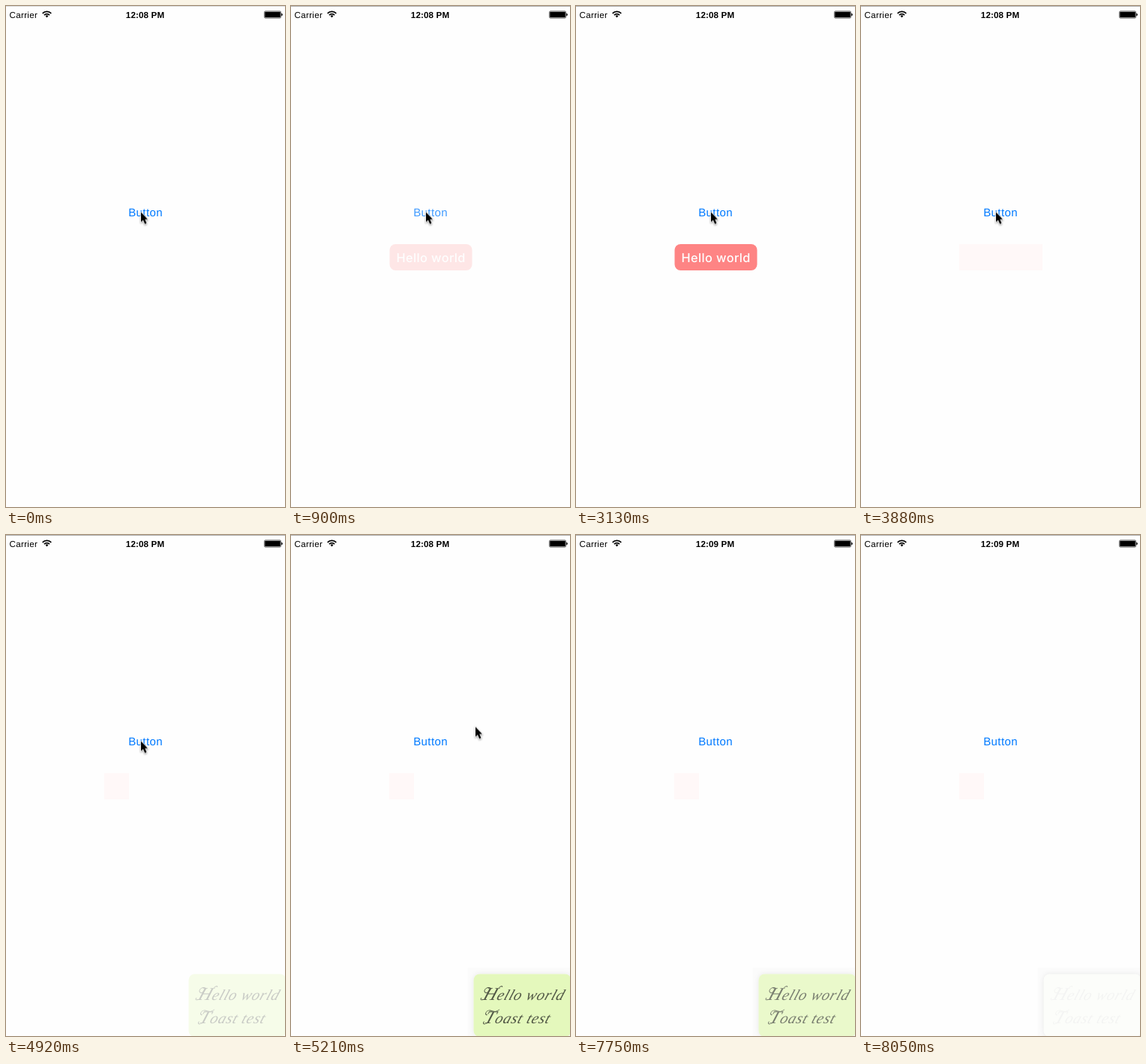
Recreate the animation shown at these times as an HTML page. Size 372 by 667 pixels, loop 8490 ms.

```html
<!DOCTYPE html>
<html lang="en">
<head>
<meta charset="utf-8">
<title>Toast demo</title>
<style>
  html, body { margin: 0; width: 100%; height: 100%; overflow: hidden; background: #fefefe; }
  svg { display: block; width: 372px; height: 667px; }
  text { font-family: "Liberation Sans", Arial, sans-serif; white-space: pre; text-rendering: geometricPrecision; }

  .anim { animation: 8490ms step-end infinite; }
  .edge { animation-name: edge; }
  .button { animation-name: press; fill: #007aff; font-size: 15px; letter-spacing: .4px; }
  .red { animation-name: red; }
  .red text { font: 500 16.3px Inter, sans-serif; letter-spacing: .4px; fill: #fff; }
  .trace { animation-name: trace; }
  .green { animation-name: green; }
  .green text { font: italic 20px "Liberation Serif", Times, serif; letter-spacing: .8px; fill: #39402c; }
  .green .cap { font-size: 24px; }
  .swash { fill: none; stroke: #39402c; stroke-width: .9; stroke-linecap: round; }
  .halo { animation-name: halo; }
  .halo .base { fill: #fefefe; filter: drop-shadow(0 0 3px #00000014); }
  .cursor { animation-name: cursor; }
  .before { animation-name: before; }
  .after { animation-name: after; }
  .status { font-size: 11.6px; letter-spacing: .3px; }
  .clock { font-weight: bold; letter-spacing: .15px; }

  @keyframes edge { 0% { fill: #dcdcdc } 7.067%, 100% { fill: #b2b2b2 } }
  @keyframes press {
    0% { opacity: 1 } 7.067% { opacity: .2 } 8.833% { opacity: .4 }
    10.6% { opacity: .75 } 12.367% { opacity: 1 }
    52.65% { opacity: .2 } 56.183% { opacity: .5 } 57.95%, 100% { opacity: 1 }
  }
  @keyframes red {
    0% { opacity: 0 } 10.6% { opacity: .16 } 12.367% { opacity: .4 }
    14.134% { opacity: .64 } 15.901% { opacity: .87 } 17.55% { opacity: 1 }
    36.866% { opacity: .83 } 38.633% { opacity: .66 } 40.4% { opacity: .49 }
    42.167% { opacity: .33 } 43.934% { opacity: .17 } 45.7%, 100% { opacity: 0 }
  }
  @keyframes trace {
    0% { opacity: 0; width: 111px } 45.7% { opacity: 1; width: 111px }
    57.95%, 100% { opacity: 1; width: 33px }
  }
  @keyframes green {
    0% { opacity: 0 } 57.95% { opacity: .27 } 59.717% { opacity: .6 }
    61.366% { opacity: .88 } 63.133% { opacity: .97 } 64.899% { opacity: 1 }
    91.283% { opacity: .68 } 93.05% { opacity: .35 } 94.817%, 100% { opacity: .05 }
  }
  @keyframes halo { 0% { opacity: 0 } 61.366%, 100% { opacity: 1 } }
  @keyframes cursor {
    0% { transform: translate(180px, 274.5px); opacity: 1 }
    61.366% { transform: translate(246px, 255.5px); opacity: 1 }
    63.133%, 100% { transform: translate(246px, 255.5px); opacity: 0 }
  }
  @keyframes before { 0% { opacity: 1 } 68.433%, 100% { opacity: 0 } }
  @keyframes after { 0% { opacity: 0 } 68.433%, 100% { opacity: 1 } }
</style>
</head>
<body>
<svg viewBox="0 0 372 667">
  <rect class="anim edge" width="372" height="1"/>

  <text class="status" x="4.6" y="15.6">Carrier</text>
  <g fill="none" stroke="#000" stroke-width="1.7">
    <path d="M48.7 9.9a8 8 0 0 1 11.6 0"/>
    <path d="M50.9 12.1a5 5 0 0 1 7.2 0"/>
    <path d="M52.6 13.2a2.7 2.7 0 0 1 3.8 0L54.5 15.4z" fill="#000" stroke="none"/>
  </g>
  <text class="status clock anim before" x="159.8" y="15.6">12:08 PM</text>
  <text class="status clock anim after" x="159.8" y="15.6">12:09 PM</text>
  <rect x="344.4" y="6.9" width="22.2" height="9.2" rx="1.6" fill="#fff" stroke="#000" stroke-width=".6"/>
  <rect x="345.2" y="7.7" width="20.6" height="7.6" rx=".8"/>
  <path d="M367.2 9.6q1.6.3 1.6 1.9t-1.6 1.9z"/>

  <text class="anim button" x="163.2" y="280.2">Button</text>

  <rect class="anim trace" x="131" y="317" width="111" height="35" fill="#fff8f8"/>
  <g class="anim red">
    <rect x="131.5" y="317" width="110" height="35" rx="8" fill="#ff6b6b"/>
    <text x="186.7" y="340.6" text-anchor="middle">Hello world</text>
  </g>

  <g class="anim halo">
    <rect x="235.5" y="576" width="137" height="91" fill="#fbfbfb"/>
    <rect class="base" x="243.5" y="584.5" width="130" height="83.5" rx="8"/>
  </g>
  <g class="anim green">
    <rect x="243.5" y="584.5" width="130" height="83.5" rx="8" fill="#e1f8b3"/>
    <g transform="translate(255 618.5) skewX(-19)">
      <text><tspan class="cap">H</tspan>ello world</text>
      <path class="swash" d="M6-15C1-18-3-13 0-10s6-1 7-5M1 0c-2 1-4 0-3-2M17-16q3-3 4-1"/>
    </g>
    <g transform="translate(256.5 650) skewX(-19)">
      <text><tspan class="cap">T</tspan>oast test</text>
      <path class="swash" d="M1-11c-4-1-3-7 2-6s8 3 12-1M5 0C2 2-1 1 0-2"/>
    </g>
  </g>

  <g class="anim cursor">
    <path d="M0 0V13L2.9 10.4 5.2 15.8 7.5 14.8 5.3 9.6H9z" stroke="#fff" stroke-width="1.4"
      paint-order="stroke" style="filter: drop-shadow(0 1px 1px #0006)"/>
  </g>
</svg>
</body>
</html>
```
